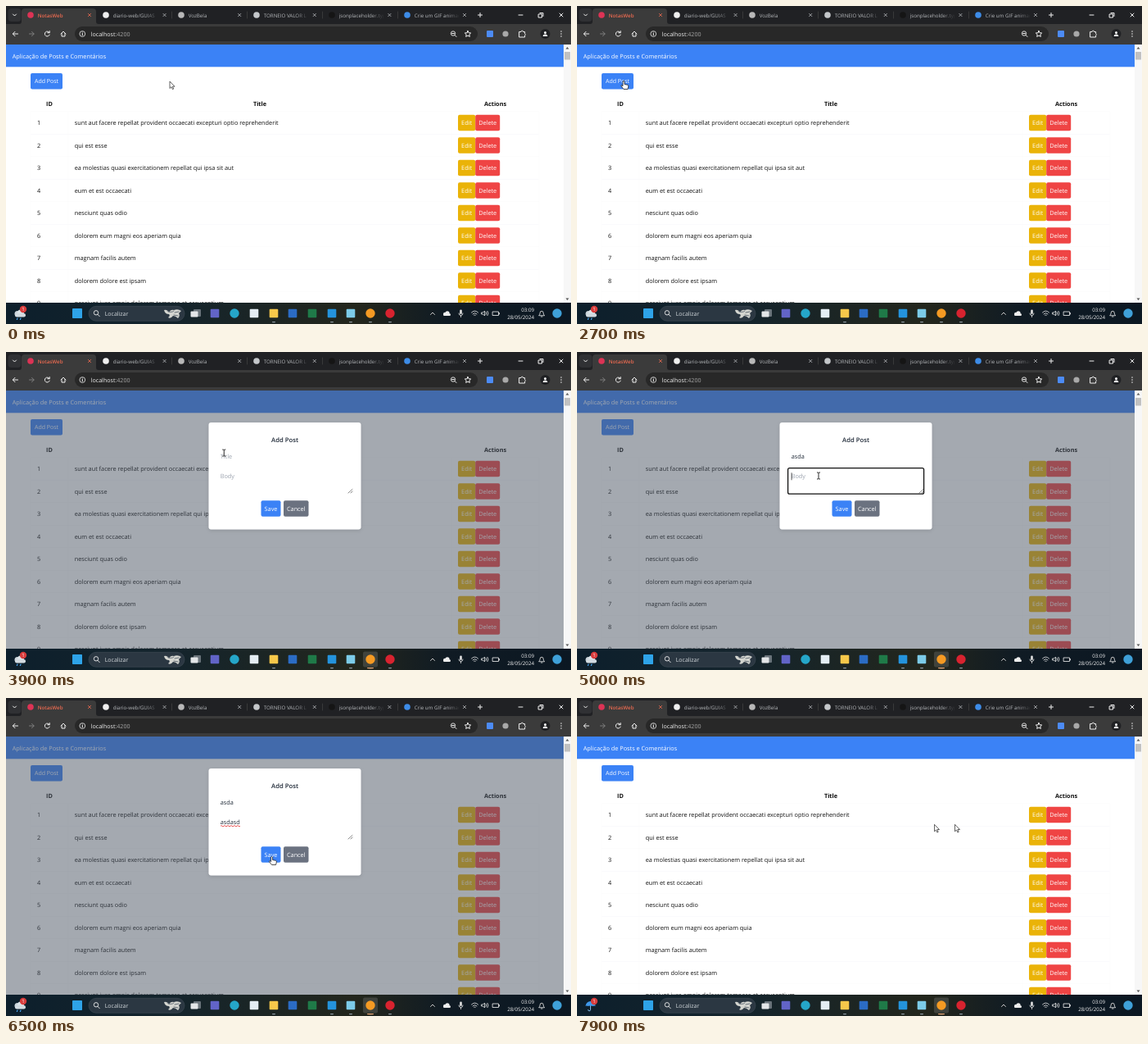
An HTML page that plays this animation: 690 by 388 pixels, repeating every 8000 ms.

```html
<!DOCTYPE html>
<html lang="pt-BR">
<head>
<meta charset="utf-8">
<title>Posts e Comentários</title>
<style>
html, body { margin: 0; width: 100%; height: 100%; overflow: hidden; background: #fff; }
svg { display: block; width: 690px; height: 388px; font: 7.3px "Open Sans", "Noto Sans", sans-serif; }
text { white-space: pre; text-rendering: geometricPrecision; }
.line { fill: none; stroke: #f1f1f1; stroke-linecap: round; stroke-linejoin: round; }
</style>
</head>
<body>
<svg id="stage" viewBox="0 0 690 388"></svg>
<script>
const LOOP = 8000, STEP = 100;
const MODAL_OPEN = 2800, MODAL_CLOSE = 6900;

const rect = (x, y, w, h, fill, r = 0, more = '') =>
  `<rect x="${x}" y="${y}" width="${w}" height="${h}" rx="${r}" fill="${fill}" ${more}/>`;
const dot = (x, y, r, fill, more = '') => `<circle cx="${x}" cy="${y}" r="${r}" fill="${fill}" ${more}/>`;
const line = (d, more = '') => `<path class="line" d="${d}" ${more}/>`;
const label = (x, y, s, fill = '#111', more = '') => `<text x="${x}" y="${y}" fill="${fill}" ${more}>${s}</text>`;
const centered = 'text-anchor="middle"';
const button = (x, y, w, s, fill, size = 7.3) =>
  rect(x, y, w, 19.5, fill, 2) + label(x + w / 2, y + 12.4, s, '#fff', `${centered} font-size="${size}"`);

const titles = [
  'sunt aut facere repellat provident occaecati excepturi optio reprehenderit',
  'qui est esse',
  'ea molestias quasi exercitationem repellat qui ipsa sit aut',
  'eum et est occaecati',
  'nesciunt quas odio',
  'dolorem eum magni eos aperiam quia',
  'magnam facilis autem',
  'dolorem dolore est ipsam',
  'nesciunt iure omnis dolorem tempora et accusantium'
];

function page() {
  const rows = titles.map((title, i) => {
    const y = 142.5 + i * 27.5;
    return rect(30, y - 13.7, 621, 27.5, 'none', 0, 'stroke="#fbfbfc" stroke-width=".6"') +
      label(38, y + 2.7, i + 1) + label(83.7, y + 2.7, title) +
      button(552, y - 9.7, 21.2, 'Edit', '#eab308') + button(573.2, y - 9.7, 30, 'Delete', '#ef4444');
  }).join('');
  const heads = [[53, 'ID'], [310, 'Title'], [597.5, 'Actions']]
    .map(([x, s]) => label(x, 122, s, '#111', `${centered} font-weight="700"`)).join('');
  return rect(0, 47, 681, 315, '#fff') + rect(0, 47, 681, 27.3, '#3b82f6') +
    label(7.7, 63.8, 'Aplicação de Posts e Comentários', '#fff') +
    button(30, 82, 39, 'Add Post', '#3b82f6', 7) + heads +
    line('M76 129V362M544 129V362', 'style="stroke:#fbfbfc;stroke-width:.6"') + rows;
}

function modal() {
  const ring = (id, y, h) => rect(257.6, y, 166, h, 'none', 2, `id="${id}" stroke="#111" stroke-width="1.3"`);
  return `<g id="modal">${rect(0, 47, 681, 315, '#4b5563', 0, 'opacity=".5"')}
    ${rect(247.5, 86, 186, 130.5, '#fff', 3, 'filter="url(#shadow)"')}
    ${label(340.5, 110.4, 'Add Post', '#1f2937', `${centered} font-weight="600" font-size="7.7"`)}
    ${label(261.7, 130.2, '', '', 'id="titleText"')}${label(261.7, 154.2, '', '', 'id="bodyText"')}
    ${line('M418 172L423 167.500M421 172L423 170', 'style="stroke:#555;stroke-width:.7"')}
    ${ring('titleRing', 117.4, 20.6)}${ring('bodyRing', 141.6, 31.6)}
    ${rect(0, 0, 0.7, 9, '#111', 0, 'id="caret"')}
    <path id="squiggle" d="M262 156.200${'q1 -1.300 2 0t2 0'.repeat(6)}" fill="none" stroke="#e03131" stroke-width=".8"/>
    ${button(311.5, 181.3, 24, 'Save', '#3b82f6')}${button(339, 181.3, 30.5, 'Cancel', '#6b7280')}</g>`;
}

function browser() {
  const tabs = [
    ['NotasWeb', '#dd3355'], ['diario-web/GUIAS', '#f0f0f0'], ['VozBela', '#b8b8b8'],
    ['TORNEIO VALOR L', '#c4c7ca'], ['jsonplaceholder.typicode', '#151515'], ['Crie um GIF animado', '#3d8ce8']
  ];
  const strip = tabs.map(([name, color], i) => {
    const x = 30 + i * 92, tint = i ? '#b5b8bb' : '#ea6a50', cross = 102 + i * 91.6;
    return dot(x, 11, 3.8, color) +
      `<svg x="${x + 8.7}" width="55" height="22">${label(0, 13.5, name, tint, `font-size="6.2" font-weight="${i ? 400 : 600}"`)}</svg>` +
      (i ? rect(x + 48, 4, 16, 14, 'url(#fade)') : '') +
      line(`M${cross - 1.7} 9.300l3.400 3.400m0 -3.400l-3.400 3.400`, `style="stroke:${tint};stroke-width:.8"`) +
      (i && i < 5 ? line(`M${x + 80.500} 7v8`, 'style="stroke:#4b4b4b;stroke-width:.6"') : '');
  }).join('');
  const icons = 'M8.500 10l2 2l2-2' +
    'M579 8.500v5M576.500 11h5M626 11h5M650.500 10h4v4h-4zM652 8.500h4v4M676 9l4 4m0-4l-4 4' +
    'M14.500 34H8.500m2.500-2.700l-2.700 2.700l2.700 2.700' +
    'M53 32.500a3 3 0 1 0 .2 2.600M53.200 30.500v2.200h-2.300' +
    'M67 34l3-3l3 3M68 33.500v3.500h4v-3.500' +
    'M93.300 33.400v2.400M93.300 32v.1' +
    'M548 35.500l2 2M544.500 33.500h3' +
    'M564 30.300l1.100 2.400l2.600.3l-1.900 1.800l.5 2.600l-2.300-1.300l-2.300 1.300l.5-2.600l-1.900-1.800l2.600-.3z' +
    'M627 31.500h2a1.300 1.300 0 0 1 2.600 0h2v2.200a1.300 1.300 0 0 1 0 2.300v2h-6.600z';
  return rect(0, 0, 690, 22, '#202124') + rect(0, 22, 690, 25, '#3b3b3b') +
    rect(2.5, 3, 16, 16, '#303134', 4) +
    `<path d="M16 22q3 0 3-3V7q0-4 4-4h83q4 0 4 4v12q0 3 3 3z" fill="#3b3b3b"/>` +
    strip + rect(84, 25, 492, 18, '#282828', 9) + line(icons, 'stroke-width="1"') +
    line('M28.500 34H34m-2.500-2.700l2.700 2.700l-2.700 2.700', 'style="stroke:#858585;stroke-width:.9"') +
    dot(93.3, 34, 3.4, 'none', 'stroke="#eee" stroke-width=".8"') +
    dot(546, 33.5, 2.7, 'none', 'stroke="#eee" stroke-width=".9"') +
    label(103.7, 36.5, 'localhost<tspan fill="#aaa">:4200</tspan>', '#f1f1f1', 'font-size="7.1"') +
    rect(587, 30, 8, 8, '#4c8bf5', 1) + dot(610, 34, 3.6, '#a9a9a9') +
    dot(658.5, 34, 6, '#202124') + dot(658.5, 32.4, 1.5, '#fff') +
    '<path d="M655.700 37q0-2.500 2.800-2.500t2.800 2.500z" fill="#fff"/>' +
    [31, 34, 37].map(y => dot(678, y, 0.8, '#e3e3e3')).join('') +
    rect(681, 47, 9, 315, '#f7f7f7') + rect(682, 56, 7, 9.5, '#c1c1c1') +
    '<path d="M683.500 52.500l2-2.500l2 2.500zM683.500 356.500l2 2.500l2-2.500z" fill="#555"/>';
}

function taskbar() {
  const apps = [
    [255, '#6264c7'], [279, '#25a6c9', 1], [303, '#e4edf3'], [327, '#f7c84a'], [350, '#2b6cc4'],
    [374, '#1f7a48'], [398, '#2493dc'], [421, '#7ccbe8'], [445, '#f59a23', 1], [469, '#d8232f', 1]
  ].map(([x, color, round]) => round ? dot(x, 375, 5.7, color) : rect(x - 5.3, 369.7, 10.6, 10.6, color, 1)).join('');
  const running = [327, 398, 421, 445, 469].map(x => rect(x - 2, 385, 4, 1.2, '#8a969f', 0.6)).join('');
  const tray = 'M518.500 376.500l2.500-2.500l2.500 2.500' +
    'M553 375a2.500 2.500 0 0 0 5 0M555.500 377.500v2' +
    'M568.500 374q4-4 8 0M570 375.800q2.500-2.500 5 0M571.700 377.300q.8-.8 1.600 0' +
    'M581 374h1.600l2-2v6l-2-2h-1.600zM586.300 373.500q1 1.500 0 3M588 372.300q2 2.700 0 5.400' +
    'M594.500 373h7v4.500h-7zM602.500 374.500v1.500' +
    'M651 377.500q1.200-1 1.200-3.200a2 2 0 0 1 4 0q0 2.200 1.200 3.200zM653.500 379h1.500';
  const clock = 'text-anchor="end" font-size="6.2"';
  return rect(0, 362, 690, 26, 'url(#bar)') +
    `<g id="cloud">${dot(14, 375.500, 3.5, '#cdd6dd')}${dot(18, 374.500, 4, '#dce4e9')}${rect(11, 375, 13, 4.5, '#d3dbe1', 2.2)}
      ${line('M14 381l-.6 1.500M18 381l-.6 1.500', 'style="stroke:#4aa3ee;stroke-width:1.2"')}</g>
    <g id="umbrella"><path d="M10.500 376a6 6 0 0 1 12 0q-1.500-1-3 0q-1.500-1-3 0q-1.500-1-3 0q-1.500-1-3 0z" fill="#3f98ea"/>
      ${line('M16.500 376v4.300q0 1.500-1.500 1.500t-1.500-1.300', 'style="stroke:#8fc6f5;stroke-width:.9"')}</g>` +
    dot(21, 370, 4.2, '#d83b3b') + label(21, 372.1, '1', '#fff', `${centered} font-size="6"`) +
    rect(81, 369, 12, 12, '#2ea3e8', 0.8) +
    rect(101, 366.3, 117, 18, '#2b3742', 9, 'stroke="#46525c" stroke-width=".5"') +
    dot(110, 374.3, 2.7, 'none', 'stroke="#eee" stroke-width=".9"') + line('M112 376.400l2.300 2.300', 'stroke-width=".9"') +
    label(120.7, 377.9, 'Localizar', '#d5dade', 'font-size="7"') +
    '<path d="M193 371q4-1 6 3q2-4 6-3q5-2 9 1l-3 3q2 3-1 6q-3-3-6-3q-3 4-6 2q3-2 1-4q-5 0-6-5z" fill="#d4d5d0"/>' +
    line('M197 372q5 3 8 0M206 374l5-1M205 377l5 1', 'style="stroke:#59636c;stroke-width:.9"') +
    rect(229, 370, 9, 9, '#69737a', 1) + rect(225.500, 372.5, 9, 7, '#e3e6e8', 1) + running +
    `<g id="appGlow">${rect(436, 365.5, 18, 19, '#fff', 2, 'opacity=".14"')}${rect(441, 385, 8, 1.2, '#e0a070', 0.6)}</g>` +
    apps + line(tray, 'stroke-width=".8"') + rect(554.2, 370.5, 2.6, 5.5, '#e3e3e3', 1.3) +
    dot(536, 375.700, 2, '#eee') + dot(539, 374.8, 2.6, '#eee') + rect(534, 375.3, 9, 2.8, '#eee', 1.4) +
    label(645, 372.8, '03:09', '#f2f2f2', clock) + label(645, 382, '28/05/2024', '#f2f2f2', clock) +
    dot(673, 375, 5.7, '#3fa0d8');
}

const arrowPath = 'M0 0V8.500L2 6.700L3.400 9.700L4.700 9.100L3.400 6.200H6z';
const cursors = `
  <path id="arrow" d="${arrowPath}" fill="#fff" stroke="#222" stroke-width=".7"/>
  <path id="hand" d="M-1 1q1-1.500 2 0v3.500l4 .8q1 .4.8 1.700l-.8 3.500h-5l-3-3.700q-.4-1.500 1-1l1 .9z"
    fill="#fff" stroke="#222" stroke-width=".8"/>
  <path id="beam" d="M-2-4h1.500l.5.500l.5-.5h1.500M0-3.500v7M-2 4h1.500l.5-.5l.5.500h1.500" fill="none" stroke="#111" stroke-width=".9"/>
  <path id="trail" d="${arrowPath}" fill="#fff" stroke="#222" stroke-width=".7" transform="translate(436.500 154.300)"/>`;

const defs = `<defs>
  <linearGradient id="fade"><stop stop-color="#202124" stop-opacity="0"/><stop offset="1" stop-color="#202124"/></linearGradient>
  <linearGradient id="bar"><stop stop-color="#0d1f2c"/><stop offset=".3" stop-color="#14242c"/>
    <stop offset=".62" stop-color="#23261c"/><stop offset=".78" stop-color="#101b24"/><stop offset="1" stop-color="#0b1722"/></linearGradient>
  <filter id="shadow" x="-20%" y="-20%" width="140%" height="140%">
    <feDropShadow dx="0" dy="1.5" stdDeviation="2" flood-opacity=".12"/></filter></defs>`;

document.getElementById('stage').innerHTML = defs + page() + modal() + browser() + taskbar() + cursors;

const $ = id => document.getElementById(id);
const show = (id, on) => $(id).style.display = on ? '' : 'none';

// Pointer stops: time, x, y
const stops = [
  [0, 200, 92], [1000, 200, 92], [2100, 57, 91], [3300, 57, 91], [4100, 305, 129], [4300, 302, 129],
  [4700, 302, 129], [5000, 295, 151], [5900, 295, 151], [6300, 324.500, 193], [7200, 325, 193.5], [7900, 461.5, 154.3]
];

function pointerAt(t) {
  const next = stops.findIndex(s => s[0] > t);
  if (next < 0) return stops.at(-1).slice(1);
  const [t0, x0, y0] = stops[next - 1], [t1, x1, y1] = stops[next];
  const p = (t - t0) / (t1 - t0), e = p * p * (3 - 2 * p);
  return [x0 + (x1 - x0) * e, y0 + (y1 - y0) * e];
}

const inside = (x, y, l, t, r, b) => x >= l && x <= r && y >= t && y <= b;

function pointerKind(x, y, open) {
  if (!open) return inside(x, y, 30, 82, 69, 101) ? 'hand' : 'arrow';
  if (inside(x, y, 257, 117, 424, 138) || inside(x, y, 257, 141, 424, 173)) return 'beam';
  return inside(x, y, 311, 181, 370, 201) ? 'hand' : 'arrow';
}

function fillField(id, typed, placeholder) {
  $(id).textContent = typed || placeholder;
  $(id).setAttribute('fill', typed ? '#1f2937' : '#9ca3af');
}

const typedBy = (word, t, start) => word.slice(0, Math.max(0, Math.floor((t - start) / STEP) + 1));

function draw(t) {
  const open = t >= MODAL_OPEN && t < MODAL_CLOSE;
  const titleTyped = typedBy('asda', t, 4500), bodyTyped = typedBy('asdasd', t, 5400);
  const inTitle = t >= 4200 && t < 5000, inBody = t >= 5000 && t < 6200;

  show('modal', open);
  fillField('titleText', titleTyped, 'Title');
  fillField('bodyText', bodyTyped, 'Body');
  show('titleRing', inTitle);
  show('bodyRing', inBody);
  show('squiggle', t >= 6300);
  show('caret', inTitle || inBody);
  if (inTitle || inBody) {
    const typed = inTitle ? titleTyped : bodyTyped;
    const width = typed ? $(inTitle ? 'titleText' : 'bodyText').getComputedTextLength() : 0;
    $('caret').setAttribute('x', 261.7 + width);
    $('caret').setAttribute('y', inTitle ? 123 : 147.3);
  }

  const [x, y] = pointerAt(t), kind = pointerKind(x, y, open);
  for (const id of ['arrow', 'hand', 'beam']) {
    show(id, id === kind);
    $(id).setAttribute('transform', `translate(${x} ${y})`);
  }
  show('trail', t >= 7900);
  show('appGlow', t >= MODAL_OPEN);
  show('cloud', t < MODAL_CLOSE);
  show('umbrella', t >= MODAL_CLOSE);
}

const start = performance.now();
function tick() {
  const t = (performance.now() - start) % LOOP;
  draw(Math.floor(t / STEP) * STEP);
  requestAnimationFrame(tick);
}
tick();
</script>
</body>
</html>
```
